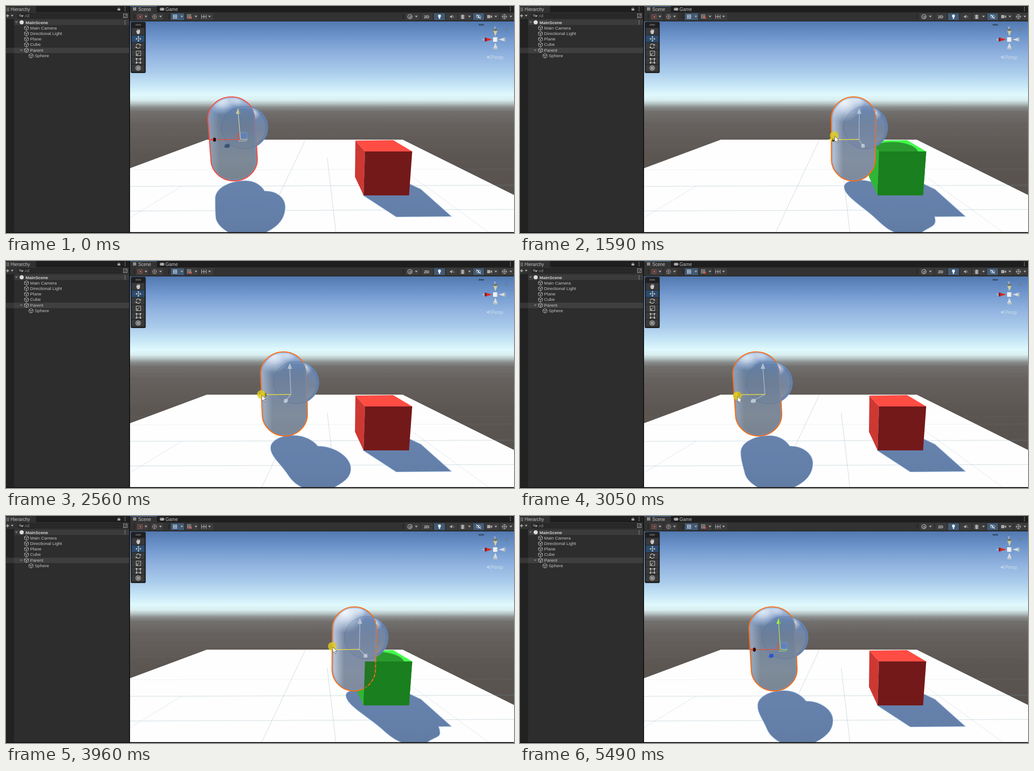
Animation, 1118 px wide and 501 px high, one loop 5970 ms. Source, as an HTML page with a canvas:

```html
<!DOCTYPE html>
<html lang="en">
<head>
<meta charset="utf-8">
<title>Scene view</title>
<style>
html, body { margin: 0; width: 1118px; height: 501px; overflow: hidden; background: #191919; }
canvas { position: absolute; left: 0; top: 0; }
span { position: absolute; white-space: pre; line-height: 12px; font-family: "Liberation Sans", Arial, sans-serif; }
</style>
</head>
<body>
<canvas id="stage" width="1118" height="501"></canvas>
<script>
const W = 1118, H = 501, LOOP = 5970;
const view = document.getElementById('stage').getContext('2d');
const back = document.createElement('canvas');
back.width = W; back.height = H;
let c = back.getContext('2d');

// ---- helpers ----
function rect(x, y, w, h, col) { c.fillStyle = col; c.fillRect(x, y, w, h); }
function trace(p, close = true) {
  c.beginPath();
  for (let i = 0; i < p.length; i += 2) c.lineTo(p[i], p[i + 1]);
  if (close) c.closePath();
}
function poly(col, ...p) { trace(p); c.fillStyle = col; c.fill(); }
function line(col, w, ...p) { trace(p, false); c.strokeStyle = col; c.lineWidth = w; c.stroke(); }
function oval(x, y, rx, ry, fill, stroke, w = 1) {
  c.beginPath(); c.ellipse(x, y, rx, ry, 0, 0, 7);
  if (fill) { c.fillStyle = fill; c.fill(); }
  if (stroke) { c.strokeStyle = stroke; c.lineWidth = w; c.stroke(); }
}
function box(x, y, w, h, col, lw = 1) { c.strokeStyle = col; c.lineWidth = lw; c.strokeRect(x, y, w, h); }
function vgrad(y0, y1, stops) {
  const g = c.createLinearGradient(0, y0, 0, y1);
  stops.forEach(([y, col]) => g.addColorStop((y - y0) / (y1 - y0), col));
  return g;
}
function glow(x, y, r, a) {
  const g = c.createRadialGradient(x, y, 0, x, y, r);
  g.addColorStop(0, `rgba(250,253,255,${a})`);
  g.addColorStop(.4, `rgba(245,250,255,${a * .75})`);
  g.addColorStop(1, 'rgba(240,248,255,0)');
  c.fillStyle = g; c.fillRect(x - r, y - r, 2 * r, 2 * r);
}
function label(s, x, y, size = 9.8, col = '#c4c4c4', bold = false) {
  const e = document.createElement('span');
  e.textContent = s;
  e.style.cssText = `left:${x}px;top:${y - 6}px;font-size:${size}px;color:${col};font-weight:${bold ? 700 : 400}`;
  document.body.append(e);
}
const caret = (x, y, col = '#aaa') => poly(col, x - 3, y - 2, x + 3, y - 2, x, y + 2);
const dots = (x, y) => [-3.5, 0, 3.5].forEach(d => rect(x - .7, y + d - .7, 1.5, 1.5, '#c0c0c0'));
function lock(x, y, col) {
  rect(x - 3, y, 6, 4, col);
  c.beginPath(); c.arc(x, y, 2, Math.PI, 0); c.strokeStyle = col; c.lineWidth = 1; c.stroke();
}
function cubeIcon(x, y) {
  line('#b8b8b8', 1, x, y - 5, x + 4.5, y - 2.5, x + 4.5, y + 2.5, x, y + 5, x - 4.5, y + 2.5, x - 4.5, y - 2.5, x, y - 5);
  line('#b8b8b8', 1, x - 4.5, y - 2.5, x, y, x + 4.5, y - 2.5);
  line('#b8b8b8', 1, x, y, x, y + 5);
}
function gridIcon(x, y, r, col) {
  for (let d = -r; d <= r; d += r) {
    line(col, 1, x - r - 1, y + d, x + r + 1, y + d);
    line(col, 1, x + d, y - r - 1, x + d, y + r + 1);
  }
}

// ---- static parts ----
function hierarchy() {
  rect(0, 0, 272, H, '#2d2d2d');
  rect(0, 0, 272, 14, '#1e1e1e');
  rect(0, 0, 66, 14, '#303030');
  rect(0, 14, 272, 15, '#313131');
  rect(0, 29, 18, 470, '#222');
  rect(18, 30, 253, 12, '#3b3b3b');
  rect(0, 92, 18, 12, '#363636');
  rect(18, 92, 253, 12, '#3f3f3f');
  rect(271, 0, 2, H, '#121212');
  [4, 7, 10].forEach(y => { rect(0, y, 1, 1, '#bbb'); rect(2, y, 5, 1, '#bbb'); });
  label('Hierarchy', 10, 7.5, 10);
  lock(248.5, 6, '#aaa'); dots(262, 6.5);
  line('#ccc', 1.4, 0, 21.5, 7, 21.5); line('#ccc', 1.4, 3.5, 18, 3.5, 25);
  caret(13.5, 21.5);
  c.beginPath(); c.roundRect(25.5, 16.5, 232, 10, 4); c.fillStyle = '#282828'; c.fill();
  c.strokeStyle = '#202020'; c.lineWidth = 1; c.stroke();
  oval(31, 20.5, 2, 2, null, '#aaa'); line('#aaa', 1, 32.5, 22, 35, 24.5); caret(36, 22.5);
  label('All', 41, 21.5, 9.5, '#858585');
  box(258.5, 17.5, 8, 8, '#aaa'); line('#bbb', 1, 261, 24, 265, 19.5);
  caret(23, 36, '#777'); oval(34.5, 36, 4.6, 4.6, '#dedede');
  label('MainScene', 43, 36.5, 9.5, '#d2d2d2', true);
  dots(262, 36);
  ['Main Camera', 'Directional Light', 'Plane', 'Cube', 'Parent', 'Sphere'].forEach((s, i) => {
    const x = i === 5 ? 10 : 0, y = 48.5 + i * 12.3;
    cubeIcon(45 + x, y); label(s, 53 + x, y);
  });
  caret(33.5, 98, '#777');
}

function toolbar() {
  rect(273, 0, 845, 14, '#1e1e1e');
  rect(273, 0, 59, 14, '#333'); rect(273, 0, 59, 1, '#3a72b0');
  rect(273, 14, 845, 20, '#323232'); rect(273, 33, 845, 1, '#202020');
  gridIcon(283, 6.5, 2.5, '#bbb'); label('Scene', 291, 7.5, 10);
  c.beginPath(); c.roundRect(338.5, 4, 10, 6, 3); c.fillStyle = '#bbb'; c.fill();
  rect(340, 6, 3, 1, '#333'); rect(345, 6, 2, 1, '#333');
  label('Game', 351, 7.5, 10); dots(1110, 6.5);
  [282, 358, 874].forEach(x => { rect(x - 1, 18, 1, 11, '#222'); rect(x + 1, 18, 1, 11, '#222'); });
  [[287, 26], [319, 27], [363, 29, 1], [396, 27], [427, 29], [880, 30], [914, 25], [942, 24, 1],
   [969, 24], [996, 30], [1028, 24, 1], [1055, 30], [1088, 30]].forEach(([x, w, on]) =>
    rect(x, 16, w, 15, on ? '#415a75' : '#3c3c3c'));
  box(290.5, 19.5, 9, 8, '#a55'); rect(294, 22, 3, 3, '#d66');
  oval(327, 23.5, 4.5, 4.5, null, '#aaa'); line('#c66', 1, 323, 23.5, 331, 23.5); line('#aaa', 1, 327, 19, 327, 28);
  gridIcon(372, 23.5, 3.5, '#dde6f0');
  gridIcon(403, 23, 3.5, '#aaa'); rect(404, 24, 5, 4, '#c55');
  line('#bbb', 1, 430, 23.5, 440, 23.5); [430, 435, 440].forEach(x => line('#bbb', 1, x + .5, 19, x + .5, 28));
  [308, 340, 387, 418, 448, 903, 1020, 1078, 1111].forEach(x => caret(x, 23.5));
  oval(889, 23.5, 4.8, 4.8, null, '#bbb', 1.2); oval(890, 24.5, 3.2, 3.2, '#777');
  label('2D', 920, 24, 9, '#ccc', true);
  oval(954, 22, 3.2, 3.2, '#e8eef5'); rect(952.5, 25, 3, 3.5, '#e8eef5');
  poly('#aaa', 977, 22, 979, 22, 982, 19.5, 982, 27.5, 979, 25, 977, 25); line('#aaa', 1, 983, 21, 986, 26);
  [21, 24, 27].forEach(y => poly('#b5b5b5', 1000, y, 1005, y - 2, 1010, y, 1005, y + 2));
  oval(1040, 23.5, 5, 3, null, '#eee'); oval(1040, 23.5, 1.5, 1.5, '#eee'); line('#eee', 1.2, 1035, 19, 1045, 28);
  rect(1059, 20, 7, 7, '#aaa'); poly('#aaa', 1066, 23.5, 1070, 20, 1070, 27);
  oval(1097, 23.5, 4.5, 4.5, null, '#bbb'); line('#bbb', 1, 1091, 23.5, 1103, 23.5); line('#bbb', 1, 1097, 18, 1097, 29);
}

function palette() {
  c.beginPath(); c.roundRect(274.5, 35, 33, 113, 3); c.fillStyle = '#1f1f1f'; c.fill();
  rect(285, 40, 12, 1, '#777'); rect(285, 42, 12, 1, '#777');
  for (let i = 0; i < 6; i++) rect(277, 48.5 + i * 16.2, 28, 15.2, i === 1 ? '#2b4b6d' : '#393939');
  const k = '#c8c8c8', x = 291;
  poly(k, 286, 55, 288, 56, 287, 52, 289, 55, 289, 50, 291, 54, 292, 50, 293, 54, 295, 51, 295, 58, 293, 62, 289, 62);
  line(k, 1, x - 5, 72.5, x + 6, 72.5); line(k, 1, x + .5, 67, x + .5, 78);
  poly(k, x - 6, 72.5, x - 3, 70, x - 3, 75); poly(k, x + 7, 72.5, x + 4, 70, x + 4, 75);
  poly(k, x + .5, 66, x - 2, 69, x + 3, 69); poly(k, x + .5, 79, x - 2, 76, x + 3, 76);
  [.3, 3.5].forEach(a => { c.beginPath(); c.arc(x, 88.5, 4.8, a, a + 2.4); c.strokeStyle = k; c.lineWidth = 1.2; c.stroke(); });
  poly(k, 294, 84, 298, 86, 294, 88); poly(k, 288, 93, 284, 91, 288, 89);
  box(286.5, 99.5, 10, 10, k); line(k, 1, 289, 107, 294, 102); box(286.5, 106, 3, 3, k);
  box(287.5, 117, 8, 8, k); [287, 296].forEach(a => [116.5, 125.5].forEach(b => rect(a - 1.5, b - 1.5, 3, 3, k)));
  oval(x, 137, 5.5, 5.5, null, k); gridIcon(x, 137, 2.5, k);
}

function compass() {
  const pale = '#d5dde2';
  rect(1040, 40, 12, 1, '#22303f'); rect(1040, 42, 12, 1, '#22303f');
  poly('#d82a24', 1055, 69.5, 1070, 74, 1055, 78.5); oval(1055.5, 74, 2, 4.5, '#8d1c1c');
  poly(pale, 1084, 74, 1098, 69.5, 1098, 78.5); oval(1098, 74, 2, 4.5, '#a8b2b8');
  poly('#cfcfaa', 1072, 53, 1082, 53, 1077, 67); oval(1077, 53, 5, 2.2, '#77765a');
  poly(pale, 1077, 81, 1072, 94, 1082, 94); oval(1077, 94, 5, 2, '#b5bec4');
  rect(1072, 69, 10, 10, '#eef1f2'); rect(1080, 69, 2, 10, '#c3c9cc');
  label('y', 1074, 47, 8, '#e3e8ee'); label('x', 1048.5, 73.5, 8, '#e3e8ee');
  lock(1102, 50, '#6f7f92');
  [109.5, 113, 116.5].forEach(y => line('#d5e3ee', 1, 1058, 113, 1066, y));
  label('Persp', 1068, 113.5, 10, '#cfdfea');
}

function world() {
  rect(273, 34, 845, 465, vgrad(34, 499, [
    [34, '#5279b0'], [70, '#7097cd'], [110, '#92b4e0'], [145, '#a9cbeb'], [175, '#c6e6f6'],
    [196, '#dff9fd'], [207, '#d9eef0'], [215, '#b8c6c7'], [223, '#8b908f'], [233, '#716f6d'],
    [260, '#66615e'], [330, '#5c5653'], [499, '#544e4b']]));
  for (let y = 224, d = 3; y < 380; y += d, d *= 1.35) line('rgba(150,150,150,.1)', 1, 273, y, 1118, y);
  poly('#fefefe', 442, 295, 873, 295, 1118, 417, 1118, 499, 273, 499, 273, 358);
  const g = 'rgba(120,155,170,.38)';
  line(g, 1, 273, 398, 1118, 395.5);
  line(g, 1, 273, 452.5, 1118, 449);
  line('rgba(120,155,170,.14)', 1, 273, 361.5, 1118, 360);
  line(g, 1, 659, 295, 563, 499);
  line(g, 1, 707, 335, 726, 499);
  line('rgba(120,155,170,.25)', 1, 388, 397, 273, 467);
  line('rgba(120,155,170,.25)', 1, 896, 378, 1062, 499);
}

world(); hierarchy(); toolbar(); palette(); compass();
rect(0, 499, W, 2, '#141414');

// ---- motion ----
// time, handle x, pointer x, pointer y
const KEYS = [
  [70, 516, 1036, 474], [200, 516, 870, 400], [345, 516, 640, 325], [480, 516, 500, 289],
  [620, 516, 457, 293], [890, 516, 458, 292], [1230, 574, 525, 286], [1520, 721, 668, 287],
  [1660, 766, 711, 288], [1800, 779, 721, 289], [2000, 779, 720, 290], [2140, 779, 717, 293],
  [2560, 626, 562, 296], [3050, 539, 479, 299], [3180, 539, 479, 299], [3820, 729, 678, 289],
  [3960, 779, 720, 289], [4300, 779, 719, 289], [4640, 679, 613, 291], [4920, 576, 515, 292],
  [4990, 573, 518, 294], [5450, 573, 953, 499]];
const RUNS = [[70, 760], [960, 1800], [2000, 3050], [3250, 4230], [4370, 5490]];

// moves advance in short steps, with rests between the runs
function stepTime(t) {
  let s = 0;
  for (const [a, b] of RUNS) if (t >= a) s = Math.min(b, a + Math.floor((t - a + 12) / 69.5) * 69.5);
  return s;
}
function slope(i, j) {
  const s = k => (KEYS[k + 1][j] - KEYS[k][j]) / (KEYS[k + 1][0] - KEYS[k][0]);
  if (i < 1 || i > KEYS.length - 2) return 0;
  const a = s(i - 1), b = s(i);
  return a * b <= 0 ? 0 : 2 * a * b / (a + b);
}
function at(t, j) {
  const n = KEYS.length - 1;
  if (t <= KEYS[0][0]) return KEYS[0][j];
  if (t >= KEYS[n][0]) return KEYS[n][j];
  let i = 0;
  while (KEYS[i + 1][0] <= t) i++;
  const d = KEYS[i + 1][0] - KEYS[i][0], u = (t - KEYS[i][0]) / d, v = 1 - u;
  return KEYS[i][j] * (1 + 2 * u) * v * v + KEYS[i + 1][j] * u * u * (3 - 2 * u)
    + d * (slope(i, j) * u * v * v - slope(i + 1, j) * u * u * v);
}

// ---- moving parts ----
// shadow outline as cubic points for handle x 516 and 679
const NEAR = [461, 425, 461, 403, 491, 386, 527, 386, 548, 386, 562, 397, 569, 409, 597, 408, 614, 425, 614, 443,
  614, 466, 602, 485, 572, 499, 550, 502, 510, 502, 490, 499, 470, 488, 462, 474, 462, 465, 461, 450, 461, 440, 461, 425];
const FAR = [640, 407, 640, 393, 660, 385, 680, 385, 709, 385, 730, 397, 741, 409, 785, 410, 826, 438, 826, 465,
  826, 480, 815, 486, 793, 499, 775, 502, 745, 502, 727, 499, 712, 492, 704, 484, 693, 471, 672, 446, 640, 426, 640, 407];
function shadows(g) {
  const k = (g - 516) / 163, p = NEAR.map((v, i) => v + (FAR[i] - v) * k);
  const blob = () => {
    c.beginPath(); c.moveTo(p[0], p[1]);
    for (let i = 2; i < p.length; i += 6) c.bezierCurveTo(...p.slice(i, i + 6));
    c.closePath();
  };
  const slab = () => trace([787, 418, 890, 394, 913, 405, 979, 464, 859, 465]);
  c.save();
  c.beginPath(); c.rect(273, 380, 845, 119); c.clip();
  c.strokeStyle = '#a6c2e6'; c.lineWidth = 2.2;
  [blob, slab].forEach(f => { f(); c.stroke(); });
  c.fillStyle = vgrad(385, 499, [[385, '#6882ab'], [440, '#6480aa'], [499, '#627ca4']]);
  [blob, slab].forEach(f => { f(); c.fill(); });
  c.restore();
}

function cubeFront(hit) { poly(hit ? '#1a7f1e' : '#73191a', 790, 321, 894, 321, 887, 418, 787, 418); }
function cube(hit) {
  poly(hit ? '#2fb636' : '#cd3833', 769, 297, 790, 321, 787, 418, 768, 377);
  const top = [769, 297, 852, 296, 894, 321, 790, 321];
  poly(hit ? '#44fb4c' : '#ff4d44', ...top);
  if (hit) {
    c.save(); trace(top); c.clip();
    oval(820, 326, 57, 26, '#2a9a2f');
    c.restore();
  }
  cubeFront(hit);
}

function body(g, hit, rim) {
  const k = (g - 516) / 263;
  const tx = 496 + 272 * k, bx = 502 + 264.5 * k, r = 52 - 3.4 * k;
  const sx = 525 + 269 * k, sr = 51 - 3 * k;
  const hull = () => {
    c.beginPath();
    c.ellipse(tx, 249, r, 48.5, 0, Math.PI, 0);
    c.ellipse(bx, 338, r - .8, 48, 0, 0, Math.PI);
    c.closePath();
  };
  const ball = () => { c.beginPath(); c.ellipse(sx, 268.5, sr, 47, 0, 0, 7); };

  c.save(); ball(); c.clip();
  rect(sx - 60, 215, 120, 110, vgrad(221, 316, [[221, '#6d8cba'], [245, '#6f87ad'], [275, '#75859d'], [316, '#8794a6']]));
  glow(sx + 14, 231, 24, .85);
  ball(); c.strokeStyle = 'rgba(75,112,170,.35)'; c.lineWidth = 10; c.stroke();
  c.restore();
  ball(); c.strokeStyle = '#6487b8'; c.lineWidth = 1.5; c.stroke();

  c.save(); hull(); c.clip();
  rect(tx - 70, 198, 150, 190, vgrad(200, 387, [
    [200, '#a9bfdd'], [214, '#9db5d6'], [228, '#6785b2'], [242, '#67809f'], [265, '#6e7f96'],
    [300, '#76869a'], [340, '#7d8996'], [387, '#78838f']]));
  if (k > 0) rect(tx - 70, 198, 150, 190, `rgba(150,165,205,${.22 * k})`);
  glow(tx - 22, 210, 30 + 18 * k, .65 + .3 * k);
  glow(tx + 12, 204, 18, .5);
  const side = c.createLinearGradient(tx - r, 0, tx - r + 26, 0);
  side.addColorStop(0, `rgba(225,235,250,${.3 + .4 * k})`); side.addColorStop(1, 'rgba(225,235,250,0)');
  c.fillStyle = side; c.fillRect(tx - r, 225, 40, 150);
  hull(); c.strokeStyle = 'rgba(110,150,205,.4)'; c.lineWidth = 7; c.stroke();
  ball(); c.fillStyle = 'rgba(85,108,145,.12)'; c.fill();
  c.strokeStyle = 'rgba(70,95,135,.4)'; c.lineWidth = 1; c.stroke();
  c.restore();

  if (hit) {
    cubeFront(true);
    c.save(); trace([790, 321, 894, 321, 887, 418, 787, 418]); c.clip();
    hull(); c.fillStyle = 'rgba(70,90,50,.22)'; c.fill();
    c.restore();
  }
  c.strokeStyle = rim; c.lineWidth = 1; c.globalAlpha = .55;
  hull(); c.stroke();
  c.globalAlpha = 1;
  c.save();
  ball();
  if (hit) c.rect(787, 316, 110, 103);
  c.rect(273, 34, 845, 465); c.clip('evenodd');
  c.lineWidth = 2.2; hull(); c.stroke();
  c.restore();
  if (hit) {
    c.save(); c.beginPath(); c.rect(tx + 25, 225, 60, 155); c.clip();
    c.setLineDash([7, 4]); c.lineWidth = 2.2; hull(); c.stroke();
    c.restore();
  }
}

function handles(g, mode, dull) {
  const k = (g - 516) / 263, y = 294.5, yx = g - 5 + 6 * k, zx = g - 29 + 42 * k;
  const drag = mode === 'drag', grey = 'rgba(190,201,214,.85)';
  const xc = mode ? '#f0df45' : dull ? '#f0473b' : '#ea5038';
  const yc = drag ? grey : dull ? '#cdcfab' : '#a5ee55';
  const zc = drag ? grey : dull ? '#3d5478' : '#2c57cf';
  if (!drag) {
    poly('rgba(225,80,65,.45)', g - 8, 282, g - 2, 279, g - 2, 291, g - 8, 294);
    rect(g - 1, 279.5, 15, 14, 'rgba(85,130,215,.5)'); box(g - .5, 279.5, 15, 14, dull ? '#7998bd' : '#6d94dc');
    trace([g - 4, 298, g, 294.5, g + 15, 294.5, g + 12, 298]); c.strokeStyle = yc; c.lineWidth = 1; c.stroke();
  }
  line(drag ? grey : dull ? '#6583ad' : '#4e7fe0', 1.3, g, y, zx, 308);
  line(yc, 1.4, g, y, yx, 237);
  line(xc, 1.5, g, y, g - 57, y + .5);
  poly(yc, yx, 225, yx - 5, 238, yx + 5, 238);
  if (!drag) poly('rgba(40,50,10,.3)', yx, 225, yx + 1, 238, yx + 5, 238);
  const d = Math.sign(zx - g) || 1, w = Math.min(7, 3 + Math.abs(zx - g) / 7);
  poly(zc, zx + d * w, 313, zx - 4, 305, zx + 4, 304, zx + 5, 310);
  oval(zx, 309, w - 1, 4.2, zc);
  poly(xc, g - 68, y + .5, g - 57, y - 4.5, g - 57, y + 5);
  oval(g - 57, y + .5, 3, 4.6, drag ? '#4a471c' : '#151012');
}

function pointer(x, y) {
  oval(x - 1, y - 1.5, 9.5, 9.5, 'rgba(224,202,28,.82)');
  trace([x, y, x, y + 13, x + 3, y + 10.3, x + 5.2, y + 15, x + 7.4, y + 14, x + 5.4, y + 9.6, x + 9.5, y + 9.4]);
  c.fillStyle = '#fff'; c.fill();
  c.strokeStyle = '#4a4a4a'; c.lineWidth = .8; c.stroke();
}

function draw(now) {
  const t = now % LOOP, s = stepTime(t), g = at(s, 1), hit = g > 745;
  const first = t < 950;
  const mode = t >= 950 && t < 4985 ? 'drag' : (t > 550 && first) || (t >= 4985 && t < 5050) ? 'hover' : '';
  c = view;
  c.drawImage(back, 0, 0);
  shadows(g);
  cube(hit);
  body(g, hit, first ? '#ff4a38' : '#ff6a0c');
  handles(g, mode, first);
  if (t >= 65 && t < 5485) {
    c.save(); c.beginPath(); c.rect(273, 34, 845, 467); c.clip();
    pointer(at(s, 2), at(s, 3));
    c.restore();
  }
}

const start = performance.now();
function tick() {
  draw(performance.now() - start);
  requestAnimationFrame(tick);
}
tick();
</script>
</body>
</html>
```
